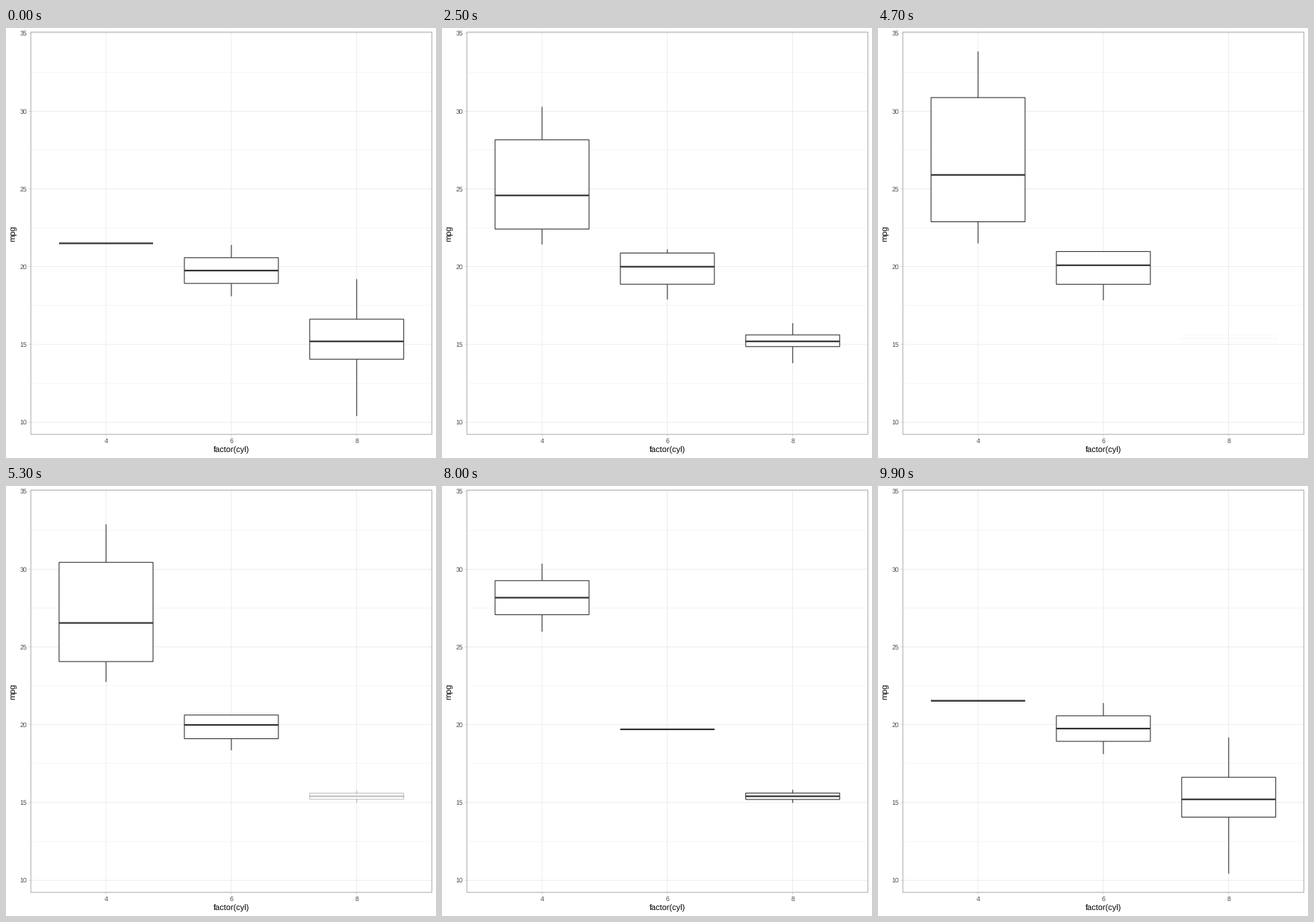
A matplotlib script for the animation above (10000 ms loop, 576 by 576 pixels).

```python
import math

import matplotlib.pyplot as plt
from matplotlib.animation import FuncAnimation
from matplotlib.patches import Rectangle

SIZE, DPI = 576, 72
FRAMES, INTERVAL = 100, 100
LEFT, RIGHT, TOP, BOTTOM = 33.3, 570.5, 5.5, 544.3
Y_MIN, Y_MAX = 9.225, 35.075
INK, GRID, EDGE = "#333333", "#dedede", "#b3b3b3"
LINE = 1.07
UNIT = (RIGHT - LEFT) / 3.2

plt.rcParams["font.family"] = "Liberation Sans"
plt.rcParams["text.hinting"] = "none"
plt.rcParams["path.snap"] = False

# Five-number summaries per cylinder count: min, lower, middle, upper, max
STATES = [
    {4: (21.5,) * 5,
     6: (18.1, 18.925, 19.75, 20.575, 21.4),
     8: (10.4, 14.05, 15.2, 16.625, 19.2)},
    {4: (21.4, 22.8, 25.85, 30.9, 33.9),
     6: (17.8, 18.85, 20.1, 21, 21)},
    {4: (26, 27.1, 28.2, 29.3, 30.4),
     6: (19.7,) * 5,
     8: (15, 15.2, 15.4, 15.6, 15.8)},
]
# Last resting frame and number of steps of each transition
MOVES = [(11, 22), (45, 22), (79, 21)]


def px(slot):
    return LEFT + (slot + 0.6) * UNIT


def py(value):
    return BOTTOM - (value - Y_MIN) / (Y_MAX - Y_MIN) * (BOTTOM - TOP)


def ease(t):
    return (1 - math.cos(math.pi * t)) / 2


fig = plt.figure(figsize=(SIZE / DPI, SIZE / DPI), dpi=DPI, facecolor="white")
ax = fig.add_axes([0, 0, 1, 1])
ax.set_xlim(0, SIZE)
ax.set_ylim(SIZE, 0)
ax.axis("off")


def segment(xs, ys, color, width, z):
    return ax.plot(xs, ys, color=color, lw=width, zorder=z,
                   solid_capstyle="butt")[0]


def label(x, y, text, size, color, ha, **kw):
    ax.text(x, y, text, fontsize=size, color=color, ha=ha,
            va=kw.pop("va", "baseline"), **kw)


class Box:
    def __init__(self, slot):
        self.x = px(slot)
        self.half = 0.375 * UNIT
        ends = [self.x - self.half, self.x + self.half]
        mid = [self.x, self.x]
        self.low = segment(mid, [0, 0], INK, LINE, 4)
        self.high = segment(mid, [0, 0], INK, LINE, 4)
        self.body = Rectangle((ends[0], 0), 2 * self.half, 0, facecolor="white",
                              edgecolor=INK, lw=LINE, zorder=5)
        ax.add_patch(self.body)
        self.middle = segment(ends, [0, 0], INK, 2 * LINE, 6)
        self.parts = [self.low, self.high, self.body, self.middle]

    def show(self, stats, alpha):
        for part in self.parts:
            part.set_visible(stats is not None)
            part.set_alpha(alpha)
        if stats is None:
            return
        y0, lower, mid, upper, y1 = map(py, stats)
        self.low.set_ydata([y0, lower])
        self.high.set_ydata([upper, y1])
        self.body.set_y(upper)
        self.body.set_height(lower - upper)
        self.middle.set_ydata([mid, mid])


def blend(a, b, t):
    """Summary and opacity between two states; boxes enter by fade, exit by shrink."""
    if t <= 0:
        return a, 1
    if t >= 1:
        return b, 1
    e = ease(t)
    if a is None:
        return b, (e if b else 1)
    if b is None:
        b = (a[2],) * 5
    return tuple(p + (q - p) * e for p, q in zip(a, b)), 1


def locate(frame):
    for i, (start, steps) in enumerate(MOVES):
        if frame <= start + steps:
            return i, max(0, (frame - start) / steps)
    return 0, 0


def draw_panel():
    for k in range(5):
        y = py(12.5 + 5 * k)
        segment([LEFT, RIGHT], [y, y], GRID, LINE / 4, 1)
    for value in range(10, 36, 5):
        y = py(value)
        segment([LEFT, RIGHT], [y, y], GRID, LINE / 2, 2)
        segment([LEFT - 2.75, LEFT], [y, y], EDGE, LINE / 2, 2)
        label(LEFT - 4.95, y + 3.15, str(value), 8.8, "#4d4d4d", "right")
    for slot, cyl in enumerate((4, 6, 8)):
        x = px(slot)
        segment([x, x], [TOP, BOTTOM], GRID, LINE / 2, 2)
        segment([x, x], [BOTTOM, BOTTOM + 2.75], EDGE, LINE / 2, 2)
        label(x, 555.8, str(cyl), 8.8, "#4d4d4d", "center")
    ax.add_patch(Rectangle((LEFT, TOP), RIGHT - LEFT, BOTTOM - TOP, fill=False,
                           edgecolor=EDGE, lw=LINE, zorder=8))
    label((LEFT + RIGHT) / 2, 568.5, "factor(cyl)", 11, "black", "center")
    label(13.3, (TOP + BOTTOM) / 2, "mpg", 11, "black", "right", va="center",
          rotation=90, rotation_mode="default") if False else \
        label(13.3, (TOP + BOTTOM) / 2, "mpg", 11, "black", "center",
              rotation=90, rotation_mode="anchor")


draw_panel()
boxes = {cyl: Box(slot) for slot, cyl in enumerate((4, 6, 8))}


def update(frame):
    i, t = locate(frame)
    here, there = STATES[i], STATES[(i + 1) % len(STATES)]
    for cyl, box in boxes.items():
        box.show(*blend(here.get(cyl), there.get(cyl), t))
    return [part for box in boxes.values() for part in box.parts]


anim = FuncAnimation(fig, update, frames=FRAMES, interval=INTERVAL,
                     init_func=lambda: update(0), repeat=True, repeat_delay=0,
                     blit=False)
plt.show()
```
